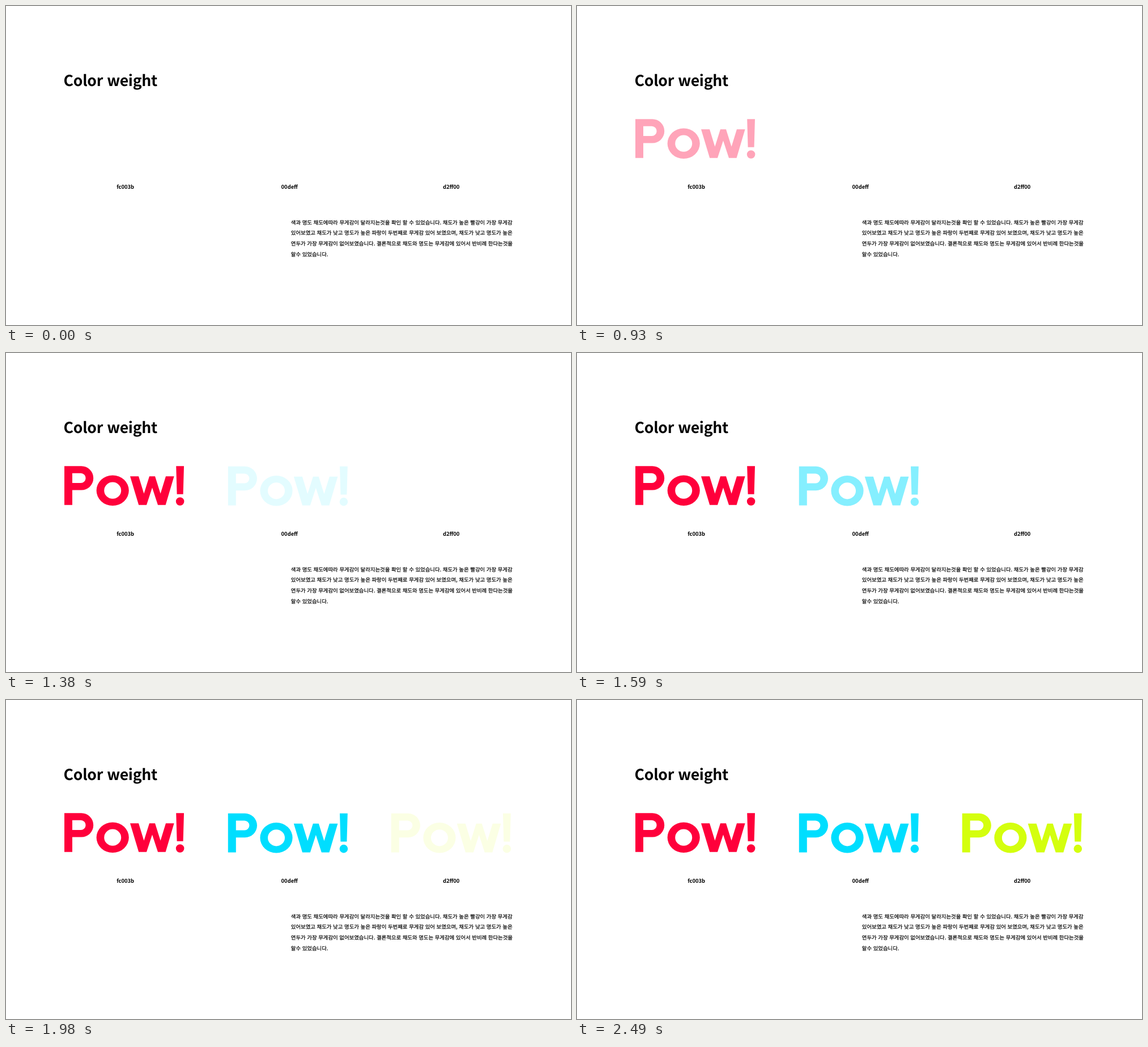
These frames come from a looping animation (997 by 562 pixels, 5820 ms). An HTML page with a canvas:

```html
<!DOCTYPE html>
<html lang="ko">
<head>
<meta charset="utf-8">
<title>Color weight</title>
<style>
html, body { margin: 0; width: 100%; height: 100%; overflow: hidden; background: #fff; }
body {
  position: relative;
  color: #000;
  font-family: "Noto Sans CJK KR", "Noto Sans CJK", sans-serif;
  text-rendering: geometricPrecision;
}
canvas { position: absolute; left: 0; top: 0; }
h1, p { position: absolute; margin: 0; white-space: nowrap; }
h1 { left: 101.6px; top: 110px; font-size: 26.6px; font-weight: 700; line-height: 39px; letter-spacing: -0.01em; }
.label { top: 311px; width: 100px; text-align: center; font-size: 9.35px; font-weight: 700; line-height: 14px; }
.note {
  left: 502.8px; top: 371.7px; width: 390.8px;
  font-size: 9.4px; line-height: 18.75px;
  -webkit-text-stroke: 0.2px #000;
}
.note span { display: block; text-align: justify; text-align-last: justify; }
.note span:last-child { text-align-last: left; }
</style>
</head>
<body>
<canvas id="stage" width="997" height="562" role="img" aria-label="Pow! Pow! Pow!"></canvas>
<h1>Color weight</h1>
<p class="label" style="left:160.6px">fc003b</p>
<p class="label" style="left:450.2px">00deff</p>
<p class="label" style="left:735.7px">d2ff00</p>
<p class="note">
  <span>색과 명도 채도에따라 무게감이 달라지는것을 확인 할 수 있었습니다. 채도가 높은 빨강이 가장 무게감</span>
  <span>있어보였고 채도가 낮고 명도가 높은 파랑이 두번째로 무게감 있어 보였으며, 채도가 낮고 명도가 높은</span>
  <span>연두가 가장 무게감이 없어보였습니다. 결론적으로 채도와 명도는 무게감에 있어서 반비례 한다는것을</span>
  <span>알수 있었습니다.</span>
</p>
<script>
const LOOP = 5820;
const TICK = 30;
const FIRST_ALPHA = 0.11;

const words = [
  { x: 103, y: 199.2, color: '#ff003b', start: 780, end: 1320 },
  { x: 391.8, y: 199.8, color: '#00deff', start: 1380, end: 1890 },
  { x: 679.7, y: 199.8, color: '#d4ff0e', start: 1980, end: 2490 }
];

const ctx = document.getElementById('stage').getContext('2d');

// Outline of "Pow!" with its top left corner at the origin
function makeWord() {
  const p = new Path2D();
  // P
  p.addPath(new Path2D(
    'M0 0H30A21.2 21.2 0 0 1 30 42.4H14V68.6H0Z' +
    'M14 12.6V29.8H29A8.6 8.6 0 0 0 29 12.6Z'));
  // o
  const ring = (rx, ry) => {
    p.moveTo(85.2 + rx, 43);
    p.ellipse(85.2, 43, rx, ry, 0, 0, Math.PI * 2);
    p.closePath();
  };
  ring(28.6, 26.8);
  ring(15, 14.6);
  // w
  p.addPath(new Path2D(
    'M116 18H131L140.4 48.5L150 18H160L169.6 48.5L179 18H193.6' +
    'L178.6 68.6H165L155 38L145 68.6H131.2Z'));
  // !
  p.addPath(new Path2D('M197.2 0H211L209.6 49.6H198.6Z'));
  p.moveTo(211.3, 62.3);
  p.arc(204.1, 62.3, 7.3, 0, Math.PI * 2);
  return p;
}

const pow = makeWord();

function alphaAt(t, { start, end }) {
  if (t < start) return 0;
  const k = Math.min(1, (t - start) / (end - start));
  return FIRST_ALPHA + (1 - FIRST_ALPHA) * k;
}

function draw(time) {
  const t = Math.floor((time % LOOP) / TICK) * TICK;
  ctx.clearRect(0, 0, 997, 562);
  for (const word of words) {
    ctx.save();
    ctx.translate(word.x, word.y);
    ctx.globalAlpha = alphaAt(t, word);
    ctx.fillStyle = word.color;
    ctx.fill(pow, 'evenodd');
    ctx.restore();
  }
}

const origin = performance.now();
function frame() {
  draw(performance.now() - origin);
  requestAnimationFrame(frame);
}
frame();
</script>
</body>
</html>
```
